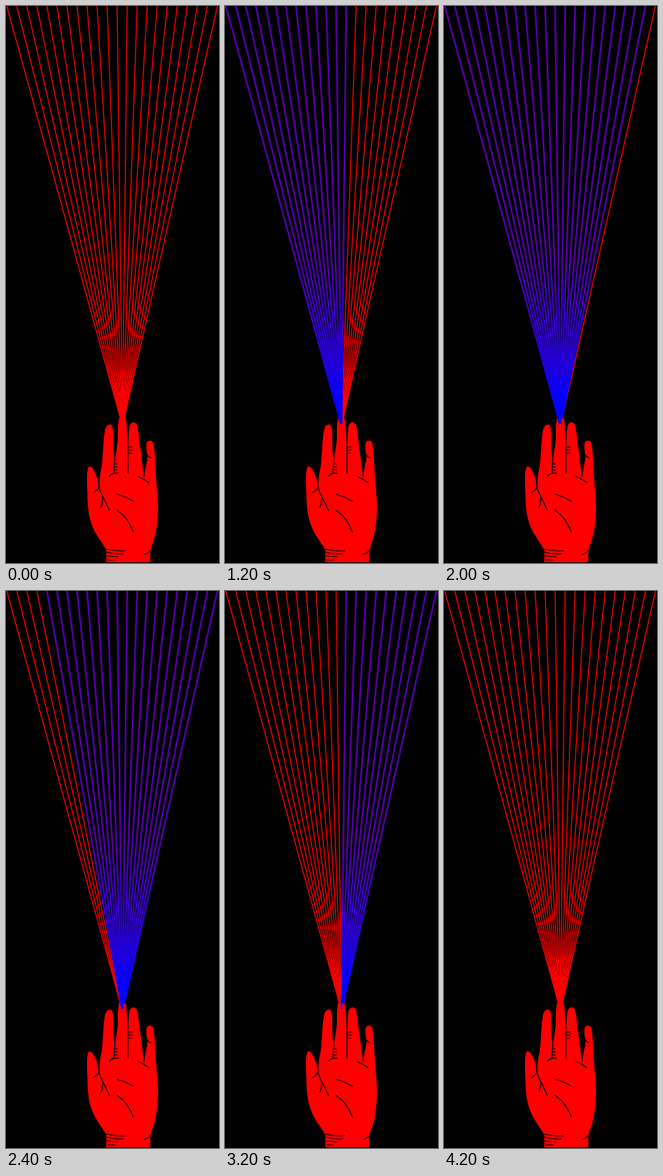
Animation, 276 px wide and 720 px high, one loop 4700 ms. Source, as an HTML page:

```html
<!DOCTYPE html>
<html lang="en">
<head>
<meta charset="utf-8">
<title>Rays from a hand</title>
<style>
  html, body { margin: 0; height: 100%; overflow: hidden; background: #000; }
  svg { display: block; }
  #red { stroke: #f00; stroke-width: 1.3; }
  #blue { stroke: url(#fade); stroke-width: 2.4; stroke-opacity: .9; }
  #creases { fill: none; stroke: #000; stroke-width: 1.2; stroke-linecap: round; }
</style>
</head>
<body>
<svg width="276" height="720" viewBox="0 0 276 720">
  <linearGradient id="fade" gradientUnits="userSpaceOnUse" x1="0" y1="0" x2="0" y2="540">
    <stop offset=".6" stop-color="#4400b4"/>
    <stop offset=".95" stop-color="#00f"/>
  </linearGradient>
  <g id="red"></g>
  <path fill="#f00" d="M130 719 L130 704 C128 697 118 687 113 675 C107 662 105.5 646 105.5 630
    C105 615 104 597 108 595 C113 595 117 606 119 613 L121 622
    C121 612 122 603 124 595 C126 580 126 561 128 550 C129 543 132 541 135 541
    C139 542 139 549 139 557 C139 568 139 578 141 588
    C143 574 145 566 145 555 C145 546 145 536 147 532 C149 529 154 529 155 533
    C157 540 157 556 158 574 C159 564 159 550 160 543 C162 537 168 537 170 542
    C172 552 173 565 175 578 C176 590 178 600 179 611
    C180 603 181 594 183 587 C184 580 181 573 182 566 C183 561 189 560 191 565
    C193 575 193 588 194 604 C195 619 197 635 197 648 C196.5 667 195 680 191 692
    C188 698 187 705 187 710 L187 719 Z"/>
  <path id="creases" d="M141 585 L140 603 M158 570 L158 604
    M134 608 Q137 603 146 604 M140 591 L144 592 M140 595 L144 596 M140 599 L144 600
    M159 570 L164 570 M159 574 L164 574 M159 578 L163 578
    M182 579 Q184 583 188 584 M171 608 Q178 611 185 616
    M144 631 Q155 634 165 640 M144 652 Q158 661 165 680
    M120 610 Q119 624 125 633 L134 652 M113 629 Q118 627 121 621 M125 634 Q126 641 123 648
    M130 702 Q142 705 155 704 M130 706 Q141 709 152 708
    M131 711 L145 712 M132 716 L141 716 M179 709 Q185 707 188 703"/>
  <g id="blue"></g>
</svg>
<script>
const COUNT = 22, STEP = 100, LOOP = 4700;
const apex = { x: 151, y: 543 };

function addRay(group, i) {
  const top = 1 + i * 13;
  const endY = i < 13 ? 540 : 533;
  const line = document.createElementNS("http://www.w3.org/2000/svg", "line");
  const ends = { x1: top, y1: 0, x2: top + (apex.x - top) * endY / apex.y, y2: endY };
  for (const key in ends) line.setAttribute(key, ends[key]);
  document.getElementById(group).append(line);
  return line;
}

const blueRays = Array.from({ length: COUNT }, (_, i) => {
  addRay("red", i);
  return addRay("blue", i);
});

// Each sweep takes 21 steps; its first step recolours two rays.
const swept = step => step > 0 ? Math.min(step + 1, COUNT) : 0;

function draw() {
  const step = Math.floor(performance.now() % LOOP / STEP);
  const from = swept(step - 21), to = swept(step);
  blueRays.forEach((ray, i) => {
    ray.style.display = i >= from && i < to ? "" : "none";
  });
  requestAnimationFrame(draw);
}
draw();
</script>
</body>
</html>
```
